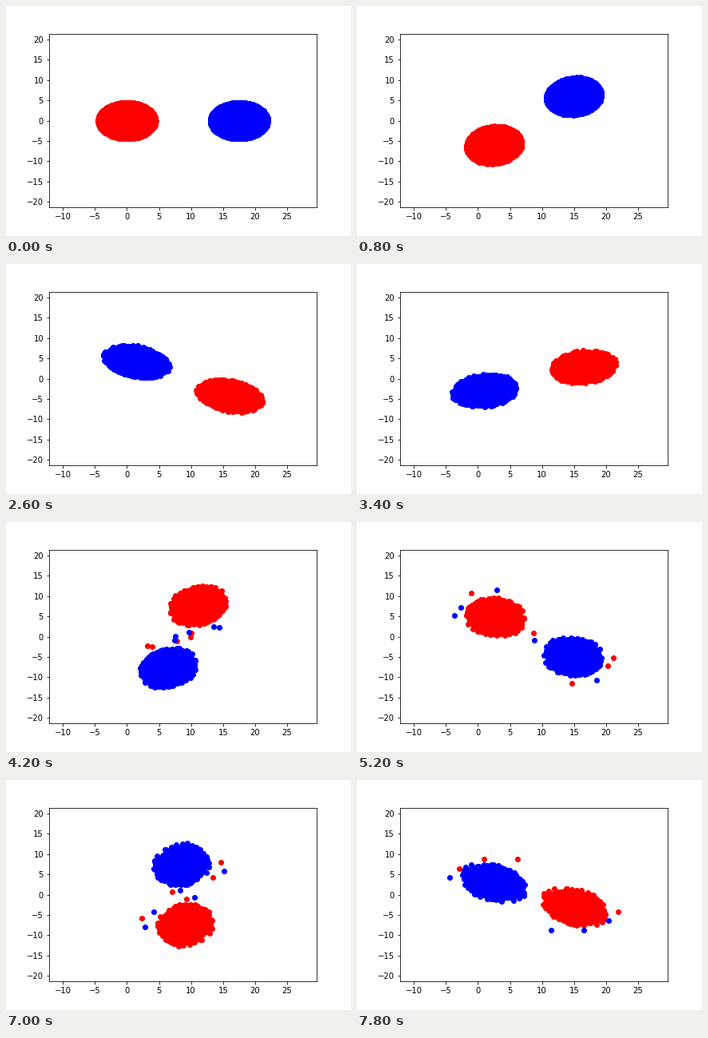
A matplotlib script for the animation above (8000 ms loop, 432 by 288 pixels).

```python
import numpy as np
import matplotlib.pyplot as plt
from matplotlib.animation import FuncAnimation

FRAMES, STEP = 40, 200
CENTRE = 8.75     # barycentre on the x axis
LEAVE, FREE = 16, 21  # strays start to leave their cluster, then circle a host

# Strays: host side (-1 partner, 1 own), angle, turn per frame, slowing, radius
STRAYS = [
    (-1, 48, 36, 0.5, 6.3),
    (-1, 42, 33, 0.45, 5.8),
    (-1, 5, 24.3, 0, 6.7),
    (-1, -8, 0.8, 0, 8.4),
    (1, 188, 30.5, 0, 6.9),
]


def polar(radius, degrees):
    return radius * np.exp(1j * np.radians(degrees))


# Unit disc of evenly filled rings, with a fixed random drift per particle
rng = np.random.default_rng(11)
RINGS = 20
disc = np.concatenate([polar(k / RINGS, np.arange(6 * k) * 60 / k)
                       for k in range(1, RINGS + 1)])
drift = rng.standard_t(9, disc.size) + 1j * rng.standard_t(9, disc.size)
spin = 20 / np.sqrt(abs(disc))


def cluster(n):
    """Particles about their own centre, stretched by a damped tide."""
    spread = 0.0021 * n
    z = (disc + spread * drift) * polar(1 - spread, spin * n)
    tide = np.cos(2 * np.pi * n / 26) * np.exp(-n / 26)
    long, wide = 4.95 - 0.45 * tide, 3.95 + 0.55 * tide
    lead = 20 * np.cos(np.pi * n / 30)
    return (long * z.real + 1j * wide * z.imag) * polar(1, lead)


def strays(n, dist):
    t = max(n - FREE, 0)
    join = np.clip((n - LEAVE) / (FREE - LEAVE), 0, 1)
    orbits = [side * dist + polar(radius, angle + turn * t - slow * t ** 2)
              for side, angle, turn, slow, radius in STRAYS]
    return dist + join * (np.array(orbits) - dist)


def positions(n):
    """All red particles relative to the barycentre; blue is the mirror."""
    dist = 8.75 - 0.02 * n - 0.0006 * n ** 2
    z = np.concatenate([dist + cluster(n), strays(n, dist)])
    return z * polar(1, 180 + 10.72 * n + 0.063 * n ** 2)


fig, ax = plt.subplots(figsize=(6, 4), dpi=72)
fig.subplots_adjust(left=0.125, right=0.9, bottom=0.125, top=0.88)
ax.set_xlim(-12.13, 29.57)
ax.set_ylim(-21.34, 21.46)
ax.set_xticks(range(-10, 26, 5))
ax.set_yticks(range(-20, 21, 5))
red, = ax.plot([], [], "o", color="red", markersize=6)
blue, = ax.plot([], [], "o", color="blue", markersize=6)


def draw(n):
    z = positions(n)
    red.set_data(CENTRE + z.real, z.imag)
    blue.set_data(CENTRE - z.real, -z.imag)
    return red, blue


anim = FuncAnimation(fig, draw, frames=FRAMES, interval=STEP,
                     repeat=True, repeat_delay=0)
plt.show()
```
